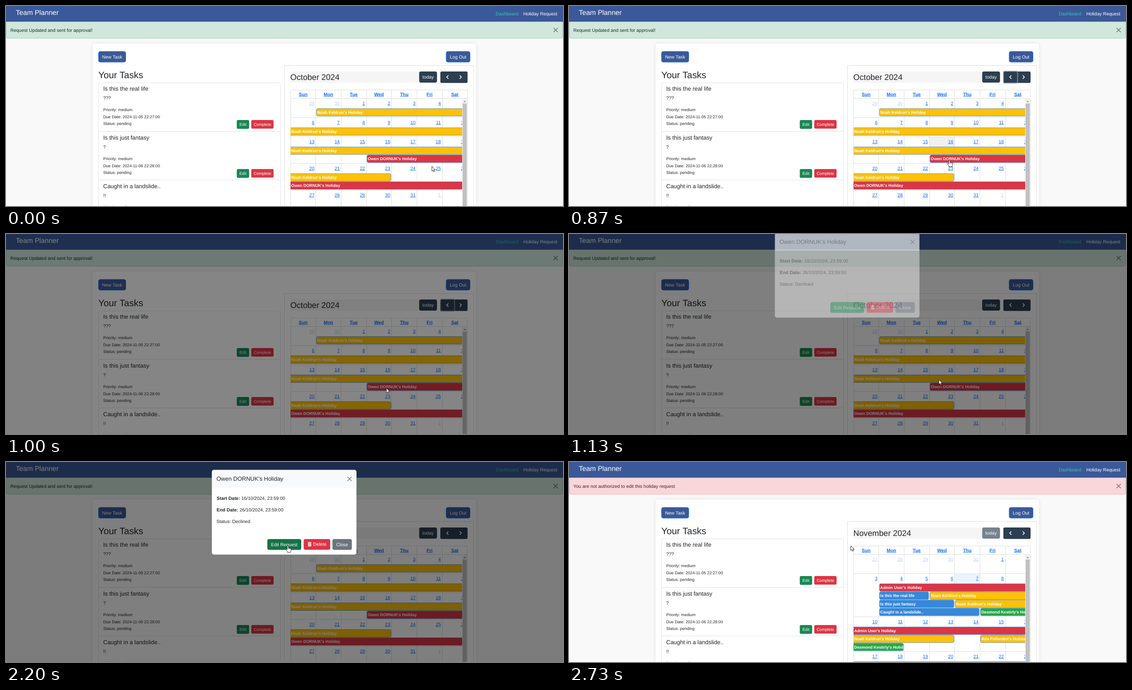
Animation of 1249 by 449 pixels, one loop 4140 ms. Source, as an HTML page with a canvas:

```html
<!DOCTYPE html>
<html lang="en">
<head>
<meta charset="utf-8">
<title>Team Planner</title>
<style>
html, body { margin: 0; width: 100%; height: 100%; overflow: hidden; background: #f9f9f9; }
canvas { display: block; }
</style>
</head>
<body>
<canvas id="stage" width="1249" height="449"></canvas>
<script>
const ctx = document.getElementById('stage').getContext('2d');
const W = 1249, H = 449, LOOP = 4140, TICK = 1000 / 15;
const INK = '#212529', LINK = '#0d6efd', NAVY = '#3b5998', SLATE = '#2c3e50';
const RED = '#dc3545', GREEN = '#198754', LINE = '#dddddd';
const BAR = { red: RED, yellow: '#ffc107', blue: '#3788d8', green: '#28a745' };
const GRID = { x: 638, right: 1023, top: 207.5, col: 56.67 };

const NOAH = "Noah Keldrun's Holiday", OWEN = "Owen DORNUK's Holiday";
const ADMIN = "Admin User's Holiday", DESMOND = "Desmond Kestirly's Holiday";
const ADA = "Ada Pellorden's Holiday";
const TASKS = [
  ['Is this the real life', '???', '2024-11-05 22:27:00'],
  ['Is this just fantasy', '?', '2024-11-06 22:28:00'],
  ['Caught in a landslide..', '!!', '2024-11-07 22:28:00']
];

// Event: slot, first column (-1 = from last week), last column (7 = into next week), colour, label
const OCTOBER = {
  title: 'October 2024', lead: 2, before: 30, days: 31,
  weeks: [
    [[0, 1, 7, 'yellow', NOAH]],
    [[0, -1, 7, 'yellow', NOAH]],
    [[0, -1, 7, 'yellow', NOAH], [1, 3, 7, 'red', OWEN]],
    [[0, -1, 3, 'yellow', NOAH], [1, -1, 7, 'red', OWEN]],
    []
  ]
};
const NOVEMBER = {
  title: 'November 2024', lead: 5, before: 31, days: 30, today: 7,
  weeks: [
    [],
    [[0, 1, 7, 'red', ADMIN], [1, 1, 2, 'blue', TASKS[0][0]], [1, 3, 7, 'yellow', NOAH],
     [2, 1, 3, 'blue', TASKS[1][0]], [2, 4, 7, 'yellow', NOAH],
     [3, 1, 4, 'blue', TASKS[2][0]], [3, 5, 7, 'green', DESMOND]],
    [[0, -1, 7, 'red', ADMIN], [1, -1, 3, 'yellow', NOAH], [1, 5, 7, 'yellow', ADA],
     [2, -1, 1, 'green', DESMOND]],
    [[0, -1, 7, 'red', ADMIN]]
  ]
};
const NOVEMBER_EMPTY = { ...NOVEMBER, weeks: [[], [], [], [], [], []] };

// Pointer path: tick, x, y
const PATH = [
  [0, 955, 360], [1, 945, 350], [3, 885, 303], [5, 813, 325], [7, 842, 345], [8, 853, 346],
  [16, 853, 346], [18, 806, 308], [21, 679, 217], [24, 636, 193], [25, 632, 188], [62, 632, 188]
];
const ARROW = new Path2D('M0 0V10.8L2.5 8.5L4.1 12.2L5.8 11.4L4.2 7.8H7.4Z');
const HAND = new Path2D('M-1.3 8.5V1.2Q-1.3 0 0 0T1.3 1.2V5Q3 4.4 3.6 5.4Q5.2 4.9 5.7 6' +
  'Q7.3 5.8 7.3 7.3V10.5Q7 12.5 6 13.5V15H-.5V13.7Q-3 11 -4.2 8.7Q-4.6 7 -3 7.2Q-2 7.4 -1.3 8.5Z');

const clamp = v => Math.min(1, Math.max(0, v));
const mix = (a, b, p) => a + (b - a) * p;
const colX = c => GRID.x + GRID.col * c;
const edge = v => Math.floor(v) + 0.5;

function text(str, x, y, size, color, bold, align = 'left') {
  ctx.font = `${bold ? 'bold ' : ''}${size}px "Liberation Sans", Arial, sans-serif`;
  ctx.textAlign = align;
  ctx.fillStyle = color;
  ctx.fillText(str, x, y);
  return ctx.measureText(str).width;
}

function box(x, y, w, h, fill, r = 0, stroke, width = 1) {
  ctx.beginPath();
  ctx.roundRect(x, y, w, h, r);
  if (fill) { ctx.fillStyle = fill; ctx.fill(); }
  if (stroke) { ctx.strokeStyle = stroke; ctx.lineWidth = width; ctx.stroke(); }
}

function lines(color, width, ...polys) {
  ctx.strokeStyle = color;
  ctx.lineWidth = width;
  ctx.beginPath();
  for (const p of polys)
    for (let i = 0; i < p.length; i += 2) ctx[i ? 'lineTo' : 'moveTo'](p[i], p[i + 1]);
  ctx.stroke();
}

function button(label, x, y, w, h, fill, size = 10.4, stroke) {
  box(x, y, w, h, fill, size > 10 ? 4 : 3, stroke);
  text(label, x + w / 2, y + h / 2 + size * 0.35, size, '#fff', false, 'center');
}

function cross(x, y, r) {
  lines('rgba(0,0,0,.52)', 1.4, [x - r, y - r, x + r, y + r], [x + r, y - r, x - r, y + r]);
}

function link(str, x, y, align, bold) {
  const w = text(str, x, y, 10.4, LINK, bold, align);
  const left = align === 'right' ? x - w : x - w / 2;
  ctx.fillRect(left, y + 1.1, w, 0.9);
}

function header(denied) {
  box(0, 0, W, H, '#f9f9f9');
  box(0, 0, W, 35.5, NAVY);
  text('Team Planner', 22, 20, 15.6, '#fff');
  text('Dashboard', 1098, 20.5, 10.4, '#2ec8bb');
  text('Holiday Request', 1236.2, 20.5, 10.4, '#fff', false, 'right');
  const [fill, rim, ink, msg] = denied
    ? ['#f8d7da', '#f1aeb5', '#58151c', 'You are not authorized to edit this holiday request']
    : ['#d1e7dd', '#a3cfbb', '#0a3622', 'Request Updated and sent for approval!'];
  box(0.5, 35.5, W - 1, 37, fill, 4, rim, 0.9);
  text(msg, 9.8, 57.5, 10.4, ink);
  cross(1232.5, 54, 4.8);
}

function tasks() {
  text('Your Tasks', 207, 161.5, 20.8, INK);
  box(207.5, 172.5, 408, 300, '#fff', 4, '#dee2e6');
  TASKS.forEach(([title, note, due], i) => {
    const y = 172 + Math.round(109.5 * i);
    if (i) lines('#dee2e6', 1, [207.5, y - 0.5, 615.5, y - 0.5]);
    text(title, 218, y + 18, 13, INK);
    text(note, 218, y + 37.7, 10.4, INK);
    text('Priority: medium', 218, y + 64, 9.1, INK);
    text('Due Date: ' + due, 218, y + 79.6, 9.1, INK);
    text('Status: pending', 218, y + 95.3, 9.1, INK);
    button('Edit', 517.5, y + 84, 27.7, 19.7, GREEN, 9.1);
    button('Complete', 550, y + 84, 50, 19.2, RED, 9.1);
  });
}

function eventBar(top, [slot, from, to, color, label]) {
  const x = from < 0 ? 635 : colX(from) + 1.6;
  const right = to > 6 ? 1045 : colX(to + 1) - 1.6;
  const y = top + 22.8 + 18.3 * slot;
  ctx.save();
  box(x, y, right - x, 16.9, BAR[color], 2.8, '#3788d8', 0.8);
  ctx.clip();
  text(label, Math.max(x + 1.6, 639.4), y + 11.7, 9.1, '#fff', true);
  ctx.restore();
}

function weekRow(month, week, top, height, marked) {
  for (let c = 0; c < 7; c++) {
    const n = week * 7 + c - month.lead + 1;
    const inside = n > 0 && n <= month.days;
    const day = n < 1 ? n + month.before : inside ? n : n - month.days;
    if (inside && (day === month.today || day === marked))
      box(colX(c), top, GRID.col, height, day === marked ? '#f0f0f0' : '#e8f4ff');
    ctx.globalAlpha = inside ? 1 : 0.3;
    link(String(day), colX(c + 1) - 3, top + 14.2, 'right');
    ctx.globalAlpha = 1;
  }
  for (let c = 0; c < 7; c++)
    lines(LINE, 1, [edge(colX(c)), top, edge(colX(c)), top + height]);
  lines(LINE, 1, [GRID.x, top + height, 1035, top + height]);
}

function calendar(month, marked, focused) {
  box(624.5, 133.5, 424, 340, '#fff', 0, LINE);
  box(638, 147, 289, 25.5, '#f5f5f5');
  text(month.title, 637.6, 165.6, 18.2, INK);
  button('today', 926.5, 147, 40, 25, month.today ? '#76828d' : SLATE);
  box(974, 147, 61, 25.7, SLATE, 3);
  if (focused) box(974.2, 146.2, 31.6, 27, null, 3, 'rgba(150,160,170,.75)', 2);
  lines('#fff', 1.6, [992, 155.8, 988.2, 159.6, 992, 163.4], [1017.4, 155.8, 1021.2, 159.6, 1017.4, 163.4]);

  box(638.5, 188.5, 396, 300, '#fff', 0, LINE);
  ['Sun', 'Mon', 'Tue', 'Wed', 'Thu', 'Fri', 'Sat'].forEach((name, c) => {
    if (c) lines(LINE, 1, [edge(colX(c)), 188, edge(colX(c)), 207]);
    link(name, colX(c + 0.5), 201.5, 'center', true);
  });
  lines(LINE, 1, [638, GRID.top, 1035, GRID.top]);

  ctx.save();
  ctx.beginPath();
  ctx.rect(GRID.x, 208, GRID.right - GRID.x, H);
  ctx.clip();
  let top = GRID.top;
  month.weeks.forEach((events, week) => {
    const slots = Math.max(0, ...events.map(e => e[0] + 1));
    const height = Math.max(43, Math.round(23.4 + 18.3 * slots));
    weekRow(month, week, top, height, marked);
    events.forEach(e => eventBar(top, e));
    top += height;
  });
  ctx.restore();

  box(1023, 208, 11, H, '#f1f1f1');
  box(1024, 219, 9, H, '#c1c1c1');
  ctx.fillStyle = '#8a8a8a';
  ctx.beginPath();
  ctx.moveTo(1025.8, 215.5);
  ctx.lineTo(1028.5, 212.5);
  ctx.lineTo(1031.2, 215.5);
  ctx.fill();
}

function page(month, denied, marked, focused) {
  header(denied);
  ctx.save();
  ctx.shadowColor = 'rgba(0,0,0,.1)';
  ctx.shadowBlur = 7;
  box(194, 84, 860, 400, '#fff', 5);
  ctx.restore();
  button('New Task', 207.5, 102, 61, 24, NAVY, 10.4, LINK);
  button('Log Out', 987, 102, 53.5, 24, NAVY, 10.4, LINK);
  tasks();
  calendar(month, marked, focused);
}

function trash(x, y) {
  box(x - 4.2, y - 4.2, 8.4, 1.5, '#fff', 0.5);
  box(x - 1.4, y - 5.1, 2.8, 1.2, '#fff', 0.4);
  box(x - 3.5, y - 2.1, 7, 7.2, '#fff', 1);
  lines(RED, 0.6, ...[-1.7, 0, 1.7].map(d => [x + d, y - 0.8, x + d, y + 3.8]));
}

function field(name, value, y) {
  const w = text(name + ' ', 472.3, y, 10.4, INK, true);
  text(value, 472.3 + w, y, 10.4, INK);
}

function modal(t, k) {
  const p = clamp((t - 1070) / 300);
  ctx.save();
  ctx.globalAlpha = clamp((t - 1070) / 150);
  ctx.translate(0, -32.5 * (1 - p) ** 2);
  box(461.5, 17.5, 324.5, 190.5, '#fff', 5, 'rgba(0,0,0,.17)', 0.7);
  box(462, 18, 323.5, 39.5, '#f8f9fa', [5, 5, 0, 0]);
  text(OWEN, 472, 42.3, 13, INK);
  cross(770.3, 38, 4.8);
  field('Start Date:', '16/10/2024, 23:59:00', 84.7);
  field('End Date:', '26/10/2024, 23:59:00', 110.7);
  text('Status: Declined', 472, 136.7, 10.4, INK);
  const h = clamp((t - 1610) / 150);
  const hover = `rgb(${mix(25, 21, h)},${mix(135, 115, h)},${mix(84, 71, h)})`;
  button('Edit Request', 586, 173, 76, 24.3, k === 32 ? '#146c43' : hover);
  button('', 667.5, 173, 59.5, 24, RED);
  trash(680.8, 184.5);
  text('Delete', 688.7, 188.4, 10.4, '#fff');
  button('Close', 732, 173, 43.5, 24.3, '#6c757d');
  ctx.restore();
}

function pointer(k) {
  const i = Math.max(1, PATH.findIndex(p => p[0] >= k));
  const [k0, x0, y0] = PATH[i - 1], [k1, x1, y1] = PATH[i];
  const p = clamp((k - k0) / (k1 - k0));
  const hand = (k >= 5 && k < 14) || (k >= 25 && k < 40);
  const shape = hand ? HAND : ARROW;
  ctx.save();
  ctx.translate(mix(x0, x1, p), mix(y0, y1, p));
  ctx.fillStyle = '#fff';
  ctx.strokeStyle = '#111';
  ctx.lineWidth = 0.9;
  ctx.lineJoin = 'round';
  ctx.fill(shape);
  ctx.stroke(shape);
  if (hand) lines('#111', 0.6, [1.4, 5, 1.4, 8], [3.5, 5.5, 3.5, 8], [5.6, 6, 5.6, 8.2]);
  ctx.restore();
}

// The screen updates fifteen times a second
function draw(ms) {
  const k = Math.min(62, Math.floor((ms + 5) / TICK));
  const t = k * TICK;
  ctx.textRendering = 'geometricPrecision';
  if (k >= 40) {
    page(k === 40 ? NOVEMBER_EMPTY : NOVEMBER, true);
  } else {
    page(OCTOBER, false, k >= 9 && k < 15 ? 16 : 0, k >= 12 && k < 17);
    const dim = 0.5 * clamp((t - 885) / 120);
    if (dim) box(0, 0, W, H, `rgba(0,0,0,${dim})`);
    if (k > 16) modal(t, k);
  }
  pointer(k);
}

const start = performance.now();
function loop() {
  draw((performance.now() - start) % LOOP);
  requestAnimationFrame(loop);
}
loop();
</script>
</body>
</html>
```
